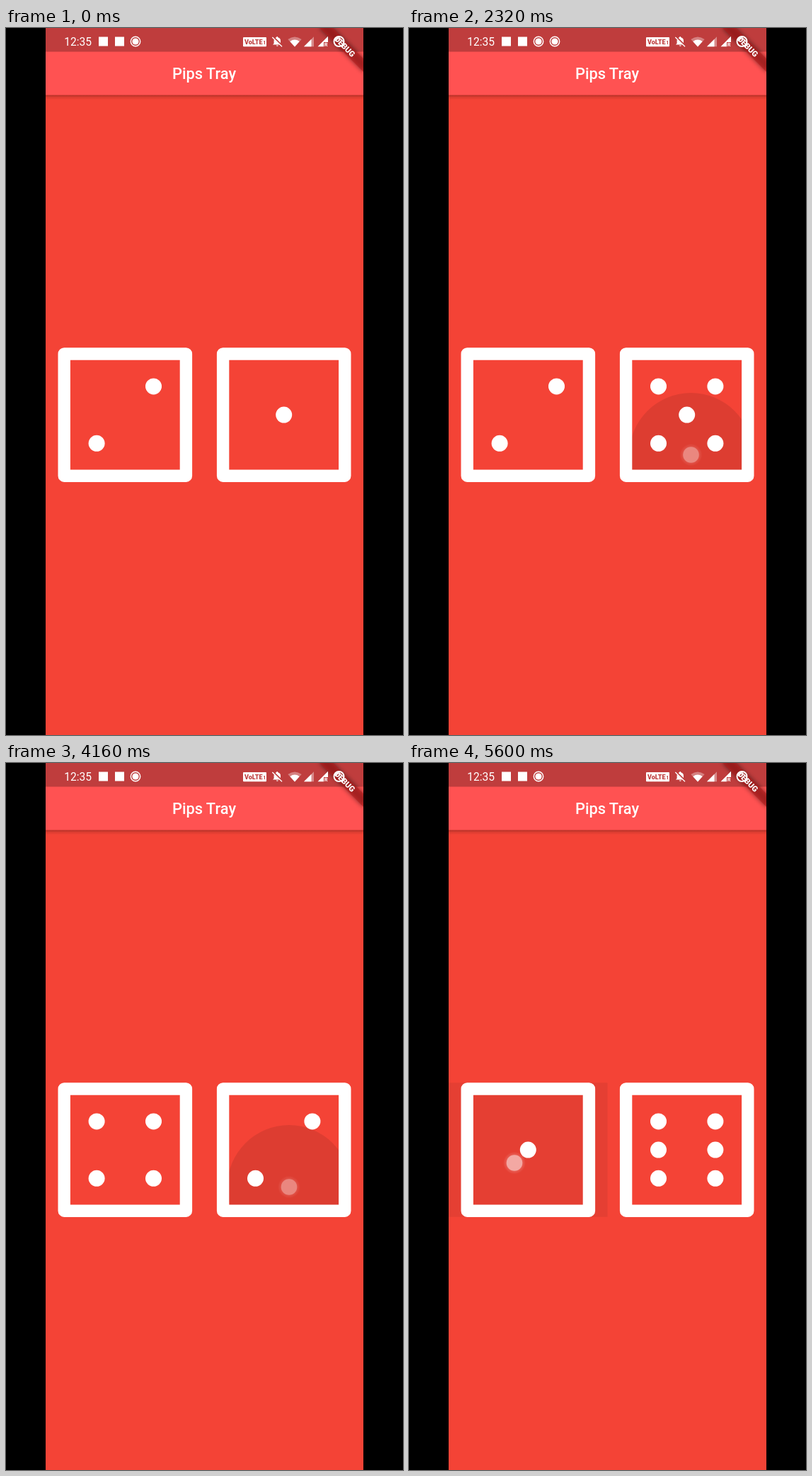
Animation of 561x998 px, one loop 5680 ms. Source, as an HTML page:

```html
<!DOCTYPE html>
<html lang="en">
<head>
<meta charset="utf-8">
<title>Dice roller</title>
<style>
html, body { margin: 0; width: 100%; height: 100%; overflow: hidden; background: #000; }
svg { display: block; width: 100%; height: 100%; }
text { font-family: Roboto, sans-serif; fill: #fff; }
</style>
</head>
<body>
<svg viewBox="0 0 561 998">
  <defs>
    <clipPath id="screen"><rect x="56" width="449" height="998"/></clipPath>
    <clipPath id="leftButton"><rect x="56" y="451.3" width="224.5" height="189.5"/></clipPath>
    <clipPath id="rightButton"><rect x="280.5" y="451.3" width="224.5" height="189.5"/></clipPath>
    <linearGradient id="barShadow" x2="0" y2="1">
      <stop stop-color="#000" stop-opacity=".3"/>
      <stop offset=".4" stop-color="#000" stop-opacity=".11"/>
      <stop offset="1" stop-color="#000" stop-opacity="0"/>
    </linearGradient>
    <filter id="soft" x="-30%" y="-150%" width="160%" height="400%"><feGaussianBlur stdDeviation="3"/></filter>
    <radialGradient id="halo">
      <stop offset=".7" stop-color="#fff" stop-opacity=".3"/>
      <stop offset="1" stop-color="#fff" stop-opacity="0"/>
    </radialGradient>
    <g id="record" fill="none" stroke="#fff">
      <circle r="6.7" stroke-width="1.4"/>
      <circle r="4.6" fill="#fff" stroke="none"/>
    </g>
  </defs>

  <rect width="561" height="998"/>
  <g clip-path="url(#screen)">
    <rect x="56" width="449" height="998" fill="#f44336"/>
    <rect x="56" y="94.5" width="449" height="7" fill="url(#barShadow)"/>
    <rect x="56" width="449" height="94.5" fill="#ff5252"/>
    <rect x="56" width="449" height="33.5" fill="#bf3d3d"/>
    <text x="280" y="72" font-size="21.8" font-weight="500" text-anchor="middle">Pips Tray</text>

    <g transform="translate(505 0) rotate(45) scale(1.091)">
      <rect x="-40" y="28" width="80" height="12" fill="#000" opacity=".5" filter="url(#soft)"/>
      <rect x="-40" y="28" width="80" height="12" fill="#b71c1c" opacity=".627"/>
      <text y="37.6" font-size="10.2" font-weight="900" text-anchor="middle">DEBUG</text>
    </g>

    <text x="82.3" y="24.6" font-size="15.6">12:35</text>
    <g fill="#fff">
      <rect x="131" y="12.5" width="13" height="13"/>
      <rect x="154" y="12.5" width="13" height="13"/>
      <use href="#record" x="183" y="19"/>
      <use id="extra" href="#record" x="206" y="19"/>

      <rect x="335" y="13" width="33" height="13.3" rx="1"/>
      <text x="337" y="23" font-size="9" font-weight="900" style="fill:#bf3d3d">VoLTE</text>
      <text x="363.3" y="22.6" font-size="7" font-weight="700" style="fill:#bf3d3d">1</text>

      <path d="M377 23.5 L378.6 21.8 V18 Q378.6 14.2 382 13.3 Q383.2 10.8 384.4 13.3 Q388 14.2 388 18 V21.8 L389.6 23.5 Z M381.7 24.4 H385 Q383.3 27.3 381.7 24.4 Z"/>
      <path d="M376.5 12 L391 26" stroke="#bf3d3d" stroke-width="3"/>
      <path d="M376.3 13 L390 26.3" stroke="#fff" stroke-width="1.3"/>

      <path d="M398.3 16 Q408 8.8 417.7 16 L408 26.5 Z" opacity=".35"/>
      <path d="M401.3 19 Q408 14.2 414.7 19 L408 26.5 Z"/>
      <path d="M421 26.3 L435 12.3 V26.3 Z" opacity=".4"/>
      <path d="M421 26.3 L431.5 15.8 V26.3 Z"/>
      <path d="M440.5 26.3 L455 11.8 V20 H449 V26.3 Z"/>
      <text x="449.8" y="26.4" font-size="7.5" font-weight="700">R</text>
      <circle cx="470.5" cy="19" r="7" fill="none" stroke="#fff" stroke-width="2"/>
      <path d="M466.5 19 A4 4 0 0 1 474.5 19" fill="none" stroke="#fff" stroke-width="1.6"/>
    </g>

    <circle id="ripple" fill="#000"/>
    <g id="dice"></g>
    <g id="touch">
      <circle r="16" fill="url(#halo)"/>
      <circle r="11.3" fill="#fff"/>
    </g>
  </g>
</svg>
<script>
const LOOP = 5680;
const ROLL_DELAY = 150, RIPPLE_SPEED = 1.15, RIPPLE_LIFE = 300;
const byId = id => document.getElementById(id);
const setAttrs = (el, attrs) => {
  for (const key in attrs) el.setAttribute(key, attrs[key]);
  return el;
};
const add = (parent, tag, attrs) => setAttrs(
  parent.appendChild(document.createElementNS("http://www.w3.org/2000/svg", tag)), attrs);
const clamp = v => Math.max(0, Math.min(1, v));

// Each tap rolls both dice shortly after the finger lands.
const taps = [
  { at: 1140, x: 399, y: 600, glow: .4, roll: [4, 5] },
  { at: 1765, x: 149, y: 566, glow: .45, roll: [2, 5] },
  { at: 2245, x: 398.5, y: 602.5, glow: .38, roll: [3, 2] },
  { at: 2890, x: 149, y: 566, glow: .45, roll: [5, 4] },
  { at: 3440, x: 399, y: 596.5, glow: .6, roll: [4, 2] },
  { at: 4085, x: 400, y: 598.5, glow: .38, roll: [4, 3] },
  { at: 4885, x: 401.5, y: 597.5, glow: .4, roll: [1, 6] },
  { at: 5450, x: 149, y: 564.5, glow: .55 }
];

// Pips as [column, row, faces that show it].
const pips = [
  [-1, -1, "456"], [1, -1, "23456"],
  [-1, 0, "6"], [0, 0, "135"], [1, 0, "6"],
  [-1, 1, "23456"], [1, 1, "456"]
];

function makeDie(cx) {
  const cy = 546.1;
  add(byId("dice"), "rect", {
    x: cx - 86.1, y: cy - 86.1, width: 172.2, height: 172.2, fill: "none",
    stroke: "#fff", "stroke-width": 17.4, "stroke-linejoin": "round"
  });
  const dots = pips.map(([col, row]) => add(byId("dice"), "circle", {
    cx: cx + col * 40.2, cy: cy + row * 40.2, r: 11.5, fill: "#fff"
  }));
  return face => dots.forEach((dot, i) => {
    dot.setAttribute("visibility", pips[i][2].includes(face) ? "visible" : "hidden");
  });
}
const dice = [makeDie(168.3), makeDie(392.7)];

function draw(t) {
  let faces = [2, 1], tap = null;
  for (const item of taps) {
    if (t >= item.at) tap = item;
    if (item.roll && t >= item.at + ROLL_DELAY) faces = item.roll;
  }
  dice.forEach((show, i) => show(faces[i]));

  const age = tap ? t - tap.at : RIPPLE_LIFE;
  const active = age < RIPPLE_LIFE;
  if (active) {
    setAttrs(byId("ripple"), {
      cx: tap.x, cy: tap.y, r: age * RIPPLE_SPEED,
      opacity: .125 * (1 - age / RIPPLE_LIFE),
      "clip-path": `url(#${tap.x < 280 ? "left" : "right"}Button)`
    });
    setAttrs(byId("touch"), {
      transform: `translate(${tap.x} ${tap.y})`,
      opacity: tap.glow * clamp((260 - age) / 60)
    });
  }
  byId("ripple").style.display = byId("touch").style.display = active ? "" : "none";
  setAttrs(byId("extra"), { opacity: clamp((t - 560) / 160) * clamp((3960 - t) / 160) });
}

const start = performance.now();
function tick() {
  draw((performance.now() - start) % LOOP);
  requestAnimationFrame(tick);
}
tick();
</script>
</body>
</html>
```
